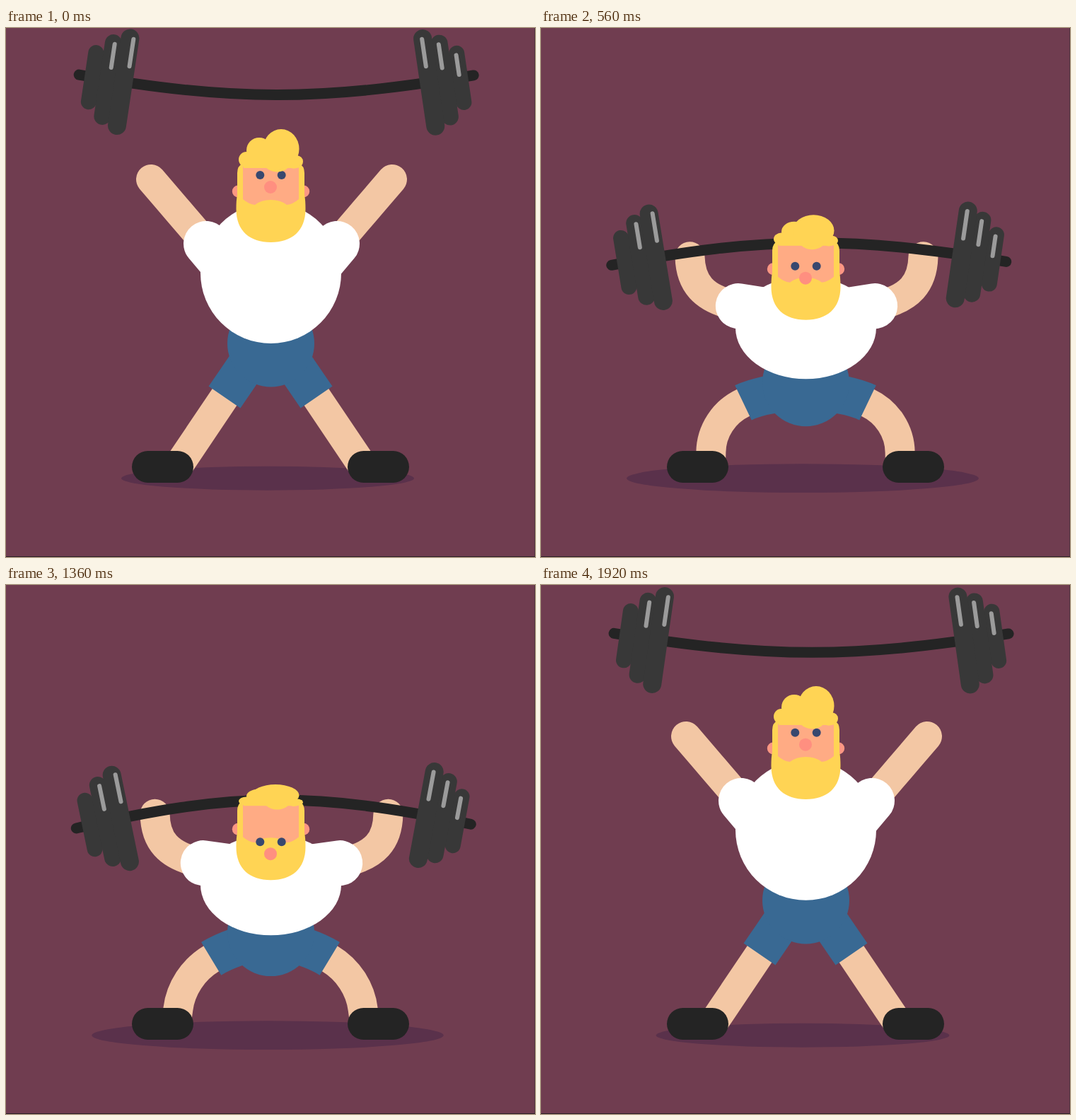
Recreate the animation shown at these times as an HTML page. Size 748 by 748 pixels, loop 1960 ms.

```html
<!DOCTYPE html>
<html lang="en">
<head>
<meta charset="utf-8">
<title>Weightlifter</title>
<style>
  html, body { margin: 0; width: 100%; height: 100%; overflow: hidden; background: #703d50; }
  svg { display: block; width: 100vw; height: 100vh; }
  .line { fill: none; }
  .skin { stroke: #f3c7a4; stroke-width: 42; }
  .cloth { stroke: #396993; stroke-width: 54.5; }
  .sleeve { stroke: #fff; stroke-width: 64; }
  .round { stroke-linecap: round; }
  .yellow { fill: #ffd454; }
  .ear { fill: #fc9783; }
  .eye { fill: #38486f; }
  .bar { stroke: #242424; stroke-width: 15; }
  .plates { fill: #383838; }
  .shine { stroke: #9b9b9b; stroke-width: 6; }
</style>
</head>
<body>
<svg viewBox="0 0 748 748">
  <rect width="748" height="748" fill="#703d50"/>
  <ellipse id="shadow" cx="370" cy="636.7" fill="#5a314b"/>

  <g id="leg">
    <path id="shin" class="line skin"/>
    <rect x="178" y="598" width="87" height="45" rx="22.5" fill="#242424"/>
    <path id="shorts" class="line cloth"/>
  </g>
  <use href="#leg" transform="translate(748 0) scale(-1 1)"/>
  <circle id="pelvis" cx="374.5" r="61.5" fill="#396993"/>

  <g id="side">
    <g id="shoulder">
      <path id="arm" class="line skin round"/>
      <path id="sleeve" class="line sleeve round"/>
    </g>
  </g>
  <use href="#side" transform="translate(751 0) scale(-1 1)"/>
  <ellipse id="torso" cx="374.5" rx="99.5" fill="#fff"/>

  <path id="bar" class="line bar round"/>
  <g id="left" class="plates"></g>
  <g id="right" class="plates"></g>

  <g id="head">
    <circle class="ear" cx="328.3" r="8.5"/>
    <circle class="ear" cx="420.7" r="8.5"/>
    <path class="yellow" d="M327 -26Q327 -36 335 -40H414Q422 -36 422 -26V5Q423.5 12 423.5 25C423.5 56 404 72 374.5 72S325.5 56 325.5 25Q325.5 12 327 5Z"/>
    <path fill="#ffab84" d="M335 -39V11Q343 18 352 19Q361 12 374.5 12T397 19Q406 18 414 11V-39Z"/>
    <g id="features">
      <circle class="eye" cx="359.3" cy="-17" r="6"/>
      <circle class="eye" cx="389.7" cy="-17" r="6"/>
      <circle cx="374" r="9" fill="#ff8f80"/>
    </g>
    <path class="yellow" d="M331 -41Q332 -34 340 -34Q346 -40 355 -39Q364 -38 367 -34Q376 -26 388 -28Q397 -30 400 -35Q404 -31 411 -33Q418 -35 419 -41Z"/>
    <g id="hair" class="yellow">
      <circle cx="340" cy="-12" r="11"/>
      <circle cx="358" cy="-25" r="18"/>
      <ellipse id="quiff" cy="-27" ry="28"/>
      <circle cx="411.3" cy="-9" r="8.7"/>
      <rect x="336" y="-18" width="76" height="18"/>
    </g>
  </g>
  <rect y="747" width="748" height="1" fill="#2b2026"/>
  <rect x="747" width="1" height="748" fill="#2b2026" opacity=".45"/>
</svg>
<script>
const LOOP = 1960, STEP = 40;
const $ = id => document.getElementById(id);
const set = (id, attrs) => {
  for (const name in attrs) $(id).setAttribute(name, attrs[name]);
};
const lerp = (a, b, k) => a + (b - a) * k;
const mix = (a, b, k) => a.map((v, i) => lerp(v, b[i], k));
const part = (t, a, b) => Math.min(1, Math.max(0, (t - a) / (b - a)));
const smooth = u => u * u * (3 - 2 * u);
const out = power => u => 1 - (1 - u) ** power;

// 0 when standing, 1 in the full squat: eases down from a to b, back up from c to d.
const pulse = (ease, a, b, c, d) => t => ease(part(t, a, b)) - smooth(part(t, c, d));

const pose = {
  depth: pulse(out(2), 40, 880, 1220, 1805),
  head: pulse(out(2), 40, 880, 1220, 1895),
  hips: pulse(out(4), 40, 880, 1235, 1670),
  squash: pulse(smooth, 0, 720, 1220, 1960),
  shadow: pulse(out(2.5), 40, 880, 1220, 1960),
  gaze: pulse(smooth, 40, 1140, 1420, 1960),
  hair: pulse(smooth, 40, 1140, 1360, 1860),
  elbow: pulse(smooth, 240, 600, 1340, 1600),
  bend: pulse(out(2.2), 40, 880, 1480, 1960)
};

// The bar flies free between release and catch, and is held in between.
const TOP = 66.5, LOW = 364, CATCH = 280, RELEASE = 1600;
const falling = t => TOP + .0024 * t ** 2;
const rising = t => TOP + .00133 * (LOOP - t) ** 2;
function barHeight(t) {
  if (t < CATCH) return falling(t);
  if (t > RELEASE) return rising(t);
  if (t < 1220) return lerp(falling(CATCH), LOW, out(2)(part(t, CATCH, 880)));
  return lerp(LOW, rising(RELEASE), part(t, 1220, RELEASE) ** 1.7);
}

// Hip, hem and ankle curve points of the left leg.
const LEG_STRAIGHT = [360, 447, 344, 471, 322, 503, 309, 522, 291.5, 548, 274, 574, 256.5, 600, 243, 620];
const LEG_BENT = [374, 514, 335, 516, 305.5, 520.7, 285.5, 530, 258, 542.7, 240, 569.7, 240, 600, 240, 620];
// From hand to shoulder, relative to the shoulder.
const ARM_STRAIGHT = [-78, -91, -52, -61, -26, -30];
const ARM_BENT = [-68, -69, -68, -33, -52, -9];

function addPlates(id, side) {
  let html = '';
  for (let i = 2; i >= 0; i--) {
    const x = side * 22.3 * i, w = 26 - 2 * i, h = 151 - 14.5 * i - 7.5 * i * i;
    html += `<rect x="${x - w / 2}" y="${-h / 2}" width="${w}" height="${h}" rx="${w / 2}"/>`;
    if (side < 0 && i === 2) continue;
    const shineX = x + (side < 0 ? 5 - 3 * i : -1);
    html += `<path class="shine round" d="M${shineX} ${13.5 - h / 2}v${39 - 5.5 * i}"/>`;
  }
  $(id).innerHTML = html;
}
addPlates('left', -1);
addPlates('right', 1);

function drawBar(y, sag) {
  const half = 279, cx = 380.5 + sag * .06, tilt = 1 - sag * .05, pull = y + sag * 4 / 3;
  set('bar', {
    d: `M${cx - half} ${y + tilt}C${cx - 60} ${pull} ${cx + 60} ${pull} ${cx + half} ${y - tilt}`
  });
  for (const [id, side] of [['left', -1], ['right', 1]]) {
    const slope = -side * .0053 * sag - tilt / half;
    const x = cx + side * 216, angle = Math.atan(slope) * 180 / Math.PI;
    set(id, { transform: `translate(${x} ${y + .36 * sag - side * tilt * .77}) rotate(${angle})` });
  }
}

function draw(t) {
  const p = {};
  for (const name in pose) p[name] = pose[name](t);

  const rx = lerp(207, 253, p.shadow);
  set('shadow', { rx, ry: rx / 12.2 });

  const leg = mix(LEG_STRAIGHT, LEG_BENT, p.hips);
  const thigh = `M${leg.slice(0, 2)}C${leg.slice(2, 8)}`;
  set('shorts', { d: thigh });
  set('shin', { d: `${thigh}C${leg.slice(8, 14)}L${leg.slice(14)}` });
  set('pelvis', { cy: lerp(446, 503, p.hips) });

  const arm = mix(ARM_STRAIGHT, ARM_BENT, p.elbow);
  set('shoulder', { transform: `translate(${283 - 4.3 * p.elbow} ${lerp(305, 408, p.depth)})` });
  set('arm', { d: `M${arm.slice(0, 2)}C${arm.slice(2)} 0 0` });
  set('sleeve', { d: `M0 0L${mix([37, 44], [40, 5], p.elbow)}` });
  set('torso', { cy: lerp(346.5, 437, p.depth), ry: lerp(99.5, 68.5, p.squash) });

  drawBar(barHeight(t), lerp(28, -37, p.bend));

  set('head', { transform: `translate(0 ${lerp(231, 359.5, p.head)})` });
  set('features', { transform: `translate(0 ${lerp(-6, 35, p.gaze)})` });
  set('hair', { transform: `translate(0 -33) scale(1 ${1 - .45 * p.hair})` });
  const quiff = 25.5 + 8 * p.hair;
  set('quiff', { rx: quiff, cx: 414.5 - quiff });
}

const start = performance.now();
function tick() {
  const t = (performance.now() - start) % LOOP;
  draw(Math.floor(t / STEP) * STEP);
  requestAnimationFrame(tick);
}
tick();
</script>
</body>
</html>
```
